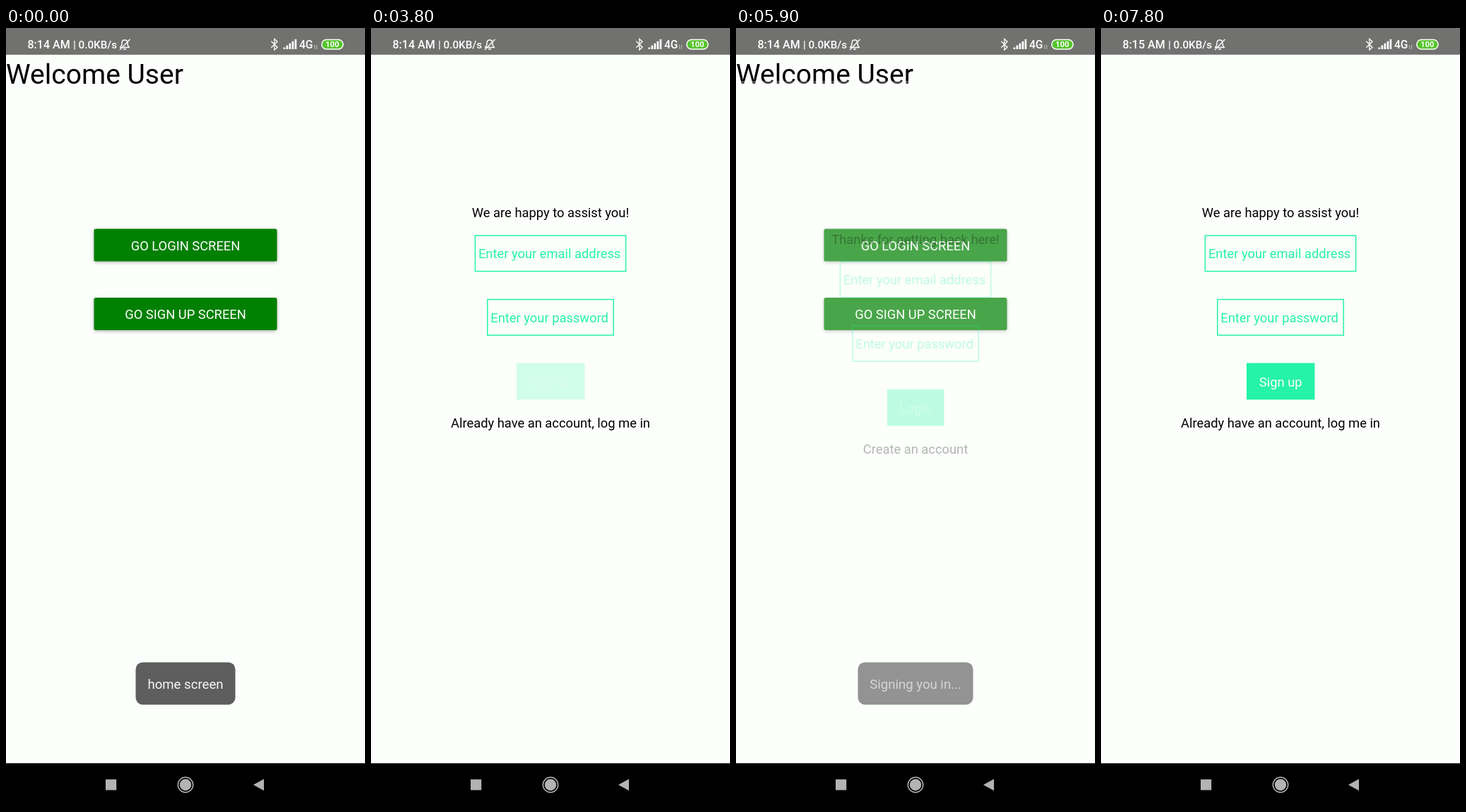
Write an HTML page with a canvas that moves like this. It is 508 px wide and 1102 px high and loops after 8 s.

```html
<!DOCTYPE html>
<html lang="en">
<head>
<meta charset="utf-8">
<title>App screens</title>
<style>
  html, body { margin: 0; width: 508px; height: 1102px; overflow: hidden; background: #fcfffc; }
  canvas { display: block; }
</style>
</head>
<body>
<canvas id="stage" width="508" height="1102"></canvas>
<script>
const ctx = document.getElementById('stage').getContext('2d');
const LOOP = 8000, STEP = 100;
const W = 508, H = 1102, TOP = 37.7, BOTTOM = 1041.5, MID = 254;
const PAPER = '#fcfffc', MINT = '#25f3a7', GREEN = '#008000', GREY = '#b3b3b3';
const BODY = 18.34, SLIDE = (BOTTOM - TOP) * 0.08;

const clamp = (v) => Math.min(1, Math.max(0, v));
const span = (t, start, length) => clamp((t - start) / length);
const easeOut = (x, power) => 1 - (1 - x) ** power;

function text(str, x, y, size, color, align = 'center', weight = 400) {
  ctx.font = `${weight} ${size}px Roboto, sans-serif`;
  ctx.textAlign = align;
  ctx.fillStyle = color;
  ctx.fillText(str, x, y);
}

function rect(x, y, w, h, color) {
  ctx.fillStyle = color;
  ctx.fillRect(x, y, w, h);
}

function pill(x, y, w, h, r, color) {
  ctx.beginPath();
  ctx.roundRect(x, y, w, h, r);
  ctx.fillStyle = color;
  ctx.fill();
}

function line(points, width, color = '#fff') {
  ctx.beginPath();
  points.forEach(([x, y]) => ctx.lineTo(x, y));
  ctx.lineWidth = width;
  ctx.strokeStyle = color;
  ctx.stroke();
}

function homeButton(label, y) {
  ctx.save();
  ctx.shadowColor = 'rgba(0,0,0,.3)';
  ctx.shadowBlur = 5;
  ctx.shadowOffsetY = 1.5;
  pill(124.5, y, 259, 46, 2.6, GREEN);
  ctx.restore();
  text(label, MID, y + 30.2, BODY, '#fff');
}

function home() {
  rect(0, TOP, W, BOTTOM - TOP, PAPER);
  text('Welcome User', 0, 79.2, 39.04, '#000', 'left');
  homeButton('GO LOGIN SCREEN', 284.5);
  homeButton('GO SIGN UP SCREEN', 381.9);
}

function field(label, x, y, w) {
  ctx.strokeStyle = MINT;
  ctx.lineWidth = 1.5;
  ctx.strokeRect(x + 0.7, y + 0.7, w - 1.4, 50.6);
  text(label, x + 5.2, y + 32.7, BODY, MINT, 'left');
}

const signUp = { title: 'We are happy to assist you!', action: 'Sign up', width: 96.5, link: 'Already have an account, log me in' };
const login = { title: 'Thanks for getting back here!', action: 'Login', width: 80.5, link: 'Create an account' };

// Progress 0 is hidden, 1 is settled; alpha applies to each element on its own.
function form(page, progress, actionAlpha = 1, linkAlpha = 1) {
  if (progress <= 0) return;
  const p = progress;
  const alpha = p < 0.5 ? p / 2 : p < 0.9 ? 0.25 + (p - 0.5) * 1.125 : 0.7 + (p - 0.9) * 3;
  ctx.save();
  ctx.translate(0, SLIDE * (1 - p));
  ctx.globalAlpha = alpha;
  rect(0, TOP, W, BOTTOM - TOP, PAPER);
  text(page.title, MID, 268.4, BODY, '#000');
  field('Enter your email address', 146.7, 293.3, 214.6);
  field('Enter your password', 164.1, 383.8, 179.8);
  ctx.globalAlpha = alpha * actionAlpha;
  rect(MID + 0.2 - page.width / 2, 474.6, page.width, 51.8, MINT);
  text(page.action, MID + 0.2, 507.6, BODY, '#fff');
  ctx.globalAlpha = alpha * linkAlpha;
  text(page.link, MID, 566.1, BODY, '#000');
  ctx.restore();
}

function toast(label, w, alpha, drop = 0) {
  if (alpha <= 0) return;
  ctx.save();
  ctx.globalAlpha = alpha;
  ctx.translate(0, drop);
  pill(MID - w / 2, 898.4, w, 60, 10, '#5e5e5e');
  text(label, MID, 936, 18.6, '#f7f7f7');
  ctx.restore();
}

function bell() {
  ctx.save();
  ctx.lineJoin = 'round';
  ctx.beginPath();
  ctx.moveTo(161.5, 27.5);
  ctx.quadraticCurveTo(164, 25.5, 164, 21.5);
  ctx.bezierCurveTo(164, 15.5, 172, 15.5, 172, 21.5);
  ctx.quadraticCurveTo(172, 25.5, 174.5, 27.5);
  ctx.closePath();
  ctx.lineWidth = 1.4;
  ctx.strokeStyle = '#fff';
  ctx.stroke();
  line([[166, 30], [170, 30]], 1.5);
  line([[161, 31], [175.5, 16]], 1.4);
  ctx.restore();
}

function battery() {
  pill(446, 15.7, 31.8, 15, 7.5, '#fff');
  pill(447.5, 17.2, 28.8, 12, 6, '#55c42b');
  text('100', 461.8, 27.4, 11.3, '#fff', 'center', 700);
}

function statusBar(clock) {
  rect(0, 0, W, TOP, '#71716f');
  text(clock, 30.5, 29, 16, '#fff', 'left', 500);
  text('| 0.0KB/s', 95, 29, 15.2, '#fff', 'left', 500);
  bell();
  line([[375.3, 18.8], [384, 27.2], [379.8, 31], [379.8, 15.5], [384, 19.3], [375.3, 27.7]], 1.3);
  for (let i = 0; i < 5; i++) {
    const h = 2.5 + i * 2.9;
    rect(392.5 + i * 4, 30 - h, 2.7, h, '#fff');
  }
  text('4G', 415, 29, 15.6, '#fff', 'left', 500);
  line([[436.7, 24], [436.7, 30]], 1, '#c4c4c2');
  line([[439.7, 24], [439.7, 30]], 1, '#c4c4c2');
  battery();
}

function navBar() {
  rect(0, BOTTOM, W, H - BOTTOM, '#000');
  rect(141, 1064.3, 15.2, 15.2, GREY);
  ctx.beginPath();
  ctx.arc(MID, 1072, 8.2, 0, 7);
  ctx.fillStyle = GREY;
  ctx.fill();
  ctx.beginPath();
  ctx.arc(MID, 1072, 10.7, 0, 7);
  ctx.lineWidth = 1.5;
  ctx.strokeStyle = GREY;
  ctx.stroke();
  ctx.beginPath();
  ctx.moveTo(350, 1072);
  ctx.lineTo(365, 1063.8);
  ctx.lineTo(365, 1080.2);
  ctx.fillStyle = GREY;
  ctx.fill();
}

const enter = (t, start) => easeOut(span(t, start, 350), 5);

function draw(t) {
  home();

  const back = 1 - span(t, 4040, 150);
  const press = t < 3800 ? 1 : 0.2 + 0.8 * span(t, 3980, 150);
  form(signUp, enter(t, 783) * back, press);

  const link = t < 7300 ? 1 : 0.2 + 0.8 * span(t, 7400, 200);
  form(login, enter(t, 5850), 1, link);
  form(signUp, enter(t, 7450));

  toast('home screen', 141, 1 - span(t, 500, 300));
  const rise = easeOut(span(t, 4020, 480), 2);
  toast('Signing you in...', 163, rise * (1 - span(t, 5800, 300)), 22 * (1 - rise));

  statusBar(t < 7100 ? '8:14 AM' : '8:15 AM');
  navBar();
}

const begin = performance.now();
function tick() {
  const t = (performance.now() - begin) % LOOP;
  draw(Math.floor(t / STEP) * STEP);
  requestAnimationFrame(tick);
}
tick();
</script>
</body>
</html>
```
